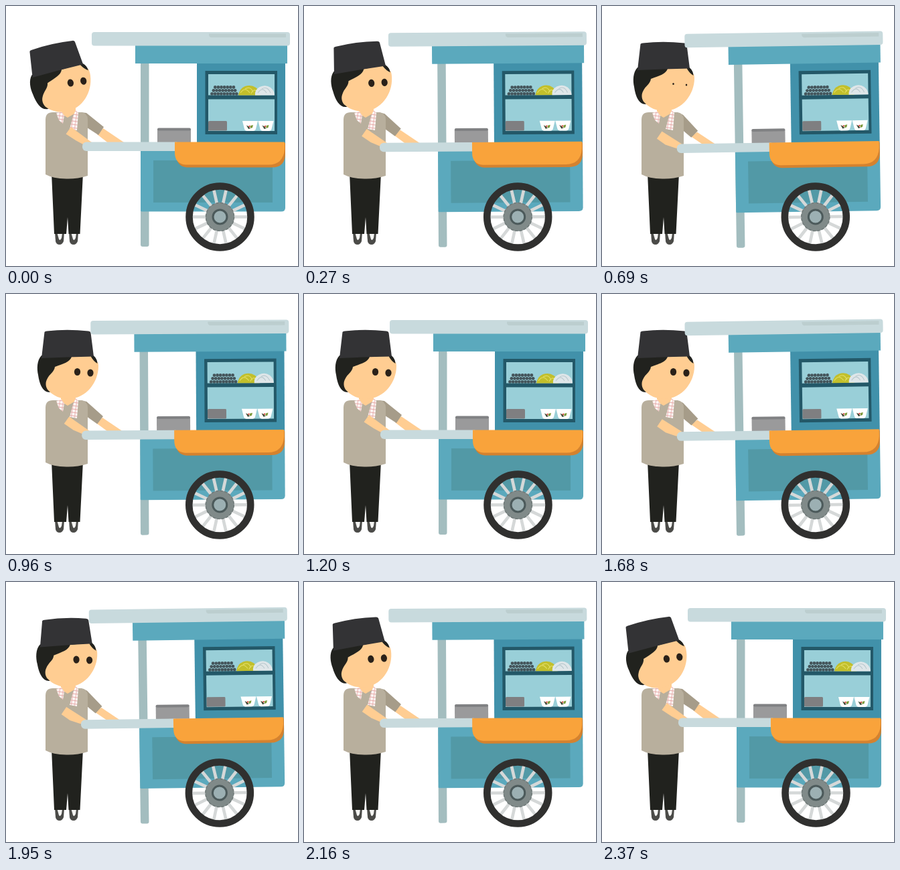
These frames come from a looping animation (436 by 389 pixels, 2.4 s). An HTML page:

```html
<!DOCTYPE html>
<html lang="en">
<head>
<meta charset="utf-8">
<title>Food cart</title>
<style>
html, body { margin: 0; width: 100%; height: 100%; overflow: hidden; background: #fff; }
svg { display: block; width: 100vw; height: 100vh; }
</style>
</head>
<body>
<svg viewBox="0 0 436 389">
  <defs>
    <pattern id="plaid" width="5" height="5" patternUnits="userSpaceOnUse" patternTransform="rotate(8)">
      <rect width="5" height="5" fill="#fdf8f6"/>
      <path d="M0 1.5H5M2 0V5" stroke="#e3a3a0" stroke-width=".9"/>
    </pattern>
    <g id="bowl">
      <path d="M0 0H23L20 12Q19 15 16 15H7Q4 15 3 12Z" fill="#fff"/>
      <path d="M6 6.5l3 1.5 3 3-3 1z" fill="#3f4a35"/>
      <path d="M12 7l4-1-1 4-3 1z" fill="#7d9a3c"/>
      <circle cx="10.5" cy="8" r="1.2" fill="#d8483c"/>
    </g>
    <g id="shoe">
      <path d="M-7 338H7L6 352Q4 357 0 357Q-5 357 -6 352Z" fill="#4b4b48"/>
      <path d="M-3.5 340H4L3 347Q1 352 -1 349Z" fill="#f4f4f2"/>
    </g>
  </defs>

  <!-- legs, body -->
  <use href="#shoe" x="80"/><use href="#shoe" x="101"/>
  <path d="M68 250H115L110.500 341H93.500L92 316L90 341H72Z" fill="#21221e"/>
  <path id="farSkin" fill="#ffcd92"/>
  <path id="farSleeve" fill="#a69c89"/>
  <path d="M59 170Q59 159 70 159H112Q122 160 122 170V254Q106 259 90 258.500Q70 258 59 252Z" fill="#b8af9d"/>
  <path d="M82 152H104V160L92 167L82 161Z" fill="#ffcd92"/>
  <path d="M75 160L83 158L87 164L85 176L79 171Z" fill="url(#plaid)"/>
  <path d="M104 156L108 160L106 186L95 184L100 165Z" fill="url(#plaid)"/>
  <path id="nearSkin" fill="#ffcd92"/>

  <!-- head, drawn upright -->
  <g id="head">
    <path d="M53 92C46 99 46 112 48 121C50 135 55 147 65 147L98 140L136 105Q137 98 130 92Z" fill="#21221e"/>
    <path d="M98 94C95 102 86 104 73 109C72 117 65 119 61 128C58 134 60 141 63 144C71 153 82 157 94 157C120 156 138 132 138 108Q138 102 135.500 101L128 92Z" fill="#ffcd92"/>
    <path d="M127 92H130.500Q136 97 136.500 104Q131 101 127 94Z" fill="#21221e"/>
    <path d="M57.500 57Q58 55.500 61 55.500Q91 52 123 55.500Q126 55.800 126.500 58L131 93.500Q92 94 53 96Z" fill="#333335"/>
    <g id="eyeL"><ellipse rx="4.600" ry="5.600" fill="#2a2119"/></g>
    <g id="eyeR"><ellipse rx="4.600" ry="5.600" fill="#2a2119"/></g>
  </g>

  <g id="cart">
    <rect x="201" y="80" width="12.500" height="280" rx="3" fill="#a3bdbf"/>
    <path d="M202 205H417V302Q417 307.500 411 307.500H202Z" fill="#5ba9bd"/>
    <rect x="220" y="231" width="178" height="63" fill="#5299a6"/>
    <rect x="201" y="217" width="1.500" height="90" fill="#5ba9bd"/>
    <rect x="285" y="84" width="132" height="121" fill="#4191aa"/>
    <rect x="193" y="57" width="227" height="29" fill="#5ba9bd"/>
    <rect x="128" y="39" width="296" height="20.500" rx="4" fill="#c8dadd"/>
    <path d="M303 41.500H418V47H306Q303 46 303 43Z" fill="#bccecf"/>
    <rect x="297.500" y="97" width="107.500" height="95" fill="#235868"/>
    <path d="M302 102H401V133.500H302ZM302 139.500H401V187H302Z" fill="#99cfd8"/>
    <g id="balls" fill="#44555b"/>
    <path d="M347 133.500Q349 123 357 120Q366 117 373 122Q379 127 380 133.500Z" fill="#c2bf2b"/>
    <path d="M350 130q7-10 14 0M357 124q8-5 12 5M366 131q4-9 10-2" fill="none" stroke="#e0dc62" stroke-width="1.200"/>
    <path d="M372 133.500Q371 125 379 121Q388 117 395 122Q401 127 401 133.500Z" fill="#dfe6e9"/>
    <path d="M376 130q7-10 13 0M382 124q8-5 13 6" fill="none" stroke="#b9c9ce" stroke-width="1.100"/>
    <rect x="302" y="172" width="28" height="14.500" rx="1.500" fill="#7f7f81"/>
    <use href="#bowl" x="353" y="172"/><use href="#bowl" x="376.500" y="172"/>
    <rect x="226" y="184" width="50" height="20" fill="#9a9a9b"/>
    <rect x="226" y="182.500" width="50" height="4" rx="2" fill="#808183"/>
    <rect x="114" y="203.500" width="146" height="13.500" rx="6" fill="#c8dadd"/>
    <path d="M254 205H417V221Q417 241.500 397 241.500H270Q254 240 254 221Z" fill="#d4822f"/>
    <path d="M252 203.500H416V214Q414 237.500 392 237.500H268Q252 236 252 219Z" fill="#f9a33b"/>
    <g transform="translate(319.500 315.500)">
      <g id="spokes" stroke="#d5d8d8" stroke-width="4.600"/>
      <circle r="46" fill="none" stroke="#30302f" stroke-width="10.500"/>
      <circle r="21.500" fill="#808a89"/>
      <circle r="21" fill="none" stroke="#707a79" stroke-width="1.500" stroke-dasharray="4 2.600"/>
      <circle r="10.500" fill="#9cb0b3" stroke="#4c5a5b" stroke-width="3"/>
    </g>
  </g>
</svg>
<script>
const LOOP = 2400, STEP = 30;
const $ = id => document.getElementById(id);
const ease = p => (1 - Math.cos(Math.PI * Math.min(1, Math.max(0, p)))) / 2;

function add(parent, tag, attrs) {
  const el = document.createElementNS("http://www.w3.org/2000/svg", tag);
  for (const k in attrs) el.setAttribute(k, attrs[k]);
  parent.append(el);
}

for (let row = 0; row < 3; row++)
  for (let i = 0; i < 9 - row; i++)
    add($("balls"), "circle", { cx: 307.5 + row * 2.4 + i * 4.6, cy: 131.3 - row * 4.9, r: 2.4 });

for (let i = 0; i < 14; i++)
  add($("spokes"), "path", { d: "M0 18V43", transform: `rotate(${(i + 0.5) * 360 / 14})` });

// limb outlines at the two ends of the cart's sway
const limbs = {
  farSkin: [[145, 183, 176, 204, 172, 209, 154, 206, 136, 192], [142, 189, 169, 207, 164, 211, 150, 207, 132, 195]],
  farSleeve: [[112, 159, 120, 160, 146, 181, 138, 193, 118, 180], [112, 159, 121, 163, 143, 187, 133, 197, 118, 184]],
  nearSkin: [[97, 181, 128, 204, 122, 209, 115, 207, 89.500, 191.500], [89, 188, 118, 206, 119, 213, 110, 213, 94, 208, 81.500, 199]]
};
limbs.nearSkin[0].splice(8, 0, 104, 201);

function limb(id, s) {
  const [a, b] = limbs[id];
  $(id).setAttribute("d", "M" + a.map((v, i) => (v + (b[i] - v) * s).toFixed(2)).join(" ") + "Z");
}

function draw(t) {
  const sway = (1 - Math.cos(2 * Math.PI * t / 1200)) / 2;
  const nod = ease(Math.min(t, LOOP - t) / 600);
  const eye = 1 - 0.85 * ease(1 - Math.abs(t - 720) / 120);
  $("cart").setAttribute("transform", `rotate(${-0.9 * sway} 320 362)`);
  $("head").setAttribute("transform", `rotate(${-12.8 * (1 - nod)} 95 161)`);
  $("eyeL").setAttribute("transform", `translate(106.500 116.500) scale(${eye})`);
  $("eyeR").setAttribute("transform", `translate(126 118) scale(${eye})`);
  for (const id in limbs) limb(id, sway);
}

const start = performance.now();
function tick() {
  const t = (performance.now() - start) % LOOP;
  draw(Math.floor(t / STEP) * STEP);
  requestAnimationFrame(tick);
}
draw(0);
requestAnimationFrame(tick);
</script>
</body>
</html>
```
